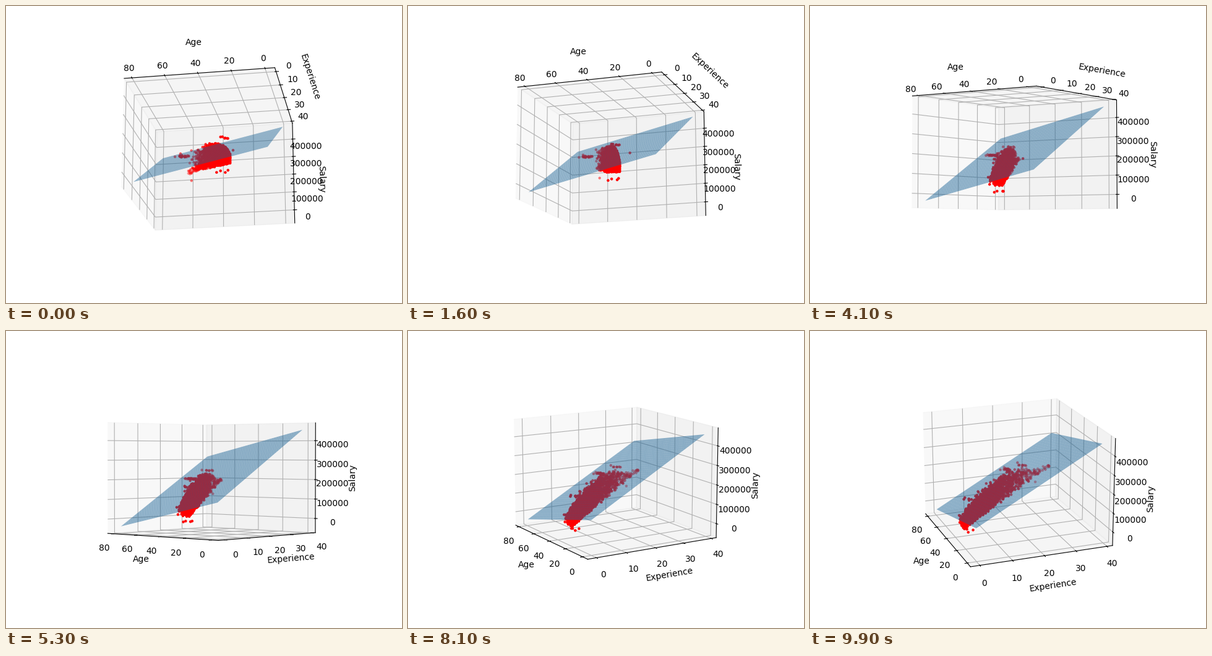
These frames come from a looping animation (640 by 480 pixels, 10 s). A matplotlib script:

```python
import numpy as np
import matplotlib.pyplot as plt
from matplotlib.animation import FuncAnimation

FRAMES, INTERVAL = 100, 100
BASE, PER_AGE, PER_EXP = 102000, -1760, 9070


def make_people(n=3000):
    """Age, experience and salary of a synthetic staff."""
    rng = np.random.default_rng(4)
    exp = np.floor(rng.gamma(1.7, 4.9, n)).clip(0, 34)
    age = np.floor(22 + exp + 11 * rng.beta(1.1, 3, n)).clip(21, 60)
    low = np.minimum(28 + 5 * exp, 186)
    width = np.maximum(55 + 11 * exp - 0.42 * exp**2, 14)
    salary = low + width * rng.beta(1.4, 1.6, n)
    people = [np.c_[age, exp, salary]]

    # small groups off the main trend: size, then mean age, experience, pay
    for size, *mean in [(4, 27, 2, 2), (6, 26, 2, 173), (7, 50, 23, 246),
                        (25, 57, 20, 203), (1, 24, 12, 170), (1, 56, 29, 121)]:
        spread = np.array([2, 0.7, 1.5]) * (size > 1)
        people.append(rng.normal(mean, spread, (size, 3)))
    return np.vstack(people).T * [[1], [1], [1000]]


def padded(values):
    lo, hi = np.min(values), np.max(values)
    pad = (hi - lo) * (0.05 + 1.1 / 48)
    return lo - pad, hi + pad


fig = plt.figure(figsize=(6.4, 4.8), dpi=100)
ax = fig.add_subplot(projection="3d", computed_zorder=False)

ax.scatter(*make_people(), color="red", marker=".", zorder=1)

age, exp = np.meshgrid(np.arange(80), np.arange(40))
plane = BASE + PER_AGE * age + PER_EXP * exp
ax.plot_surface(age, exp, plane, alpha=0.5, zorder=2)

ax.set(xlim=padded(age)[::-1], ylim=padded(exp), zlim=padded(plane),
       xticks=range(0, 81, 20), yticks=range(0, 41, 10),
       zticks=range(0, 400001, 100000),
       xlabel="Age", ylabel="Experience", zlabel="Salary")


def update(i):
    ax.view_init(elev=-20 + 0.4 * i, azim=-80 + 0.6 * i)
    return ()


anim = FuncAnimation(fig, update, frames=FRAMES, interval=INTERVAL,
                     repeat=True, repeat_delay=0)
plt.show()
```
